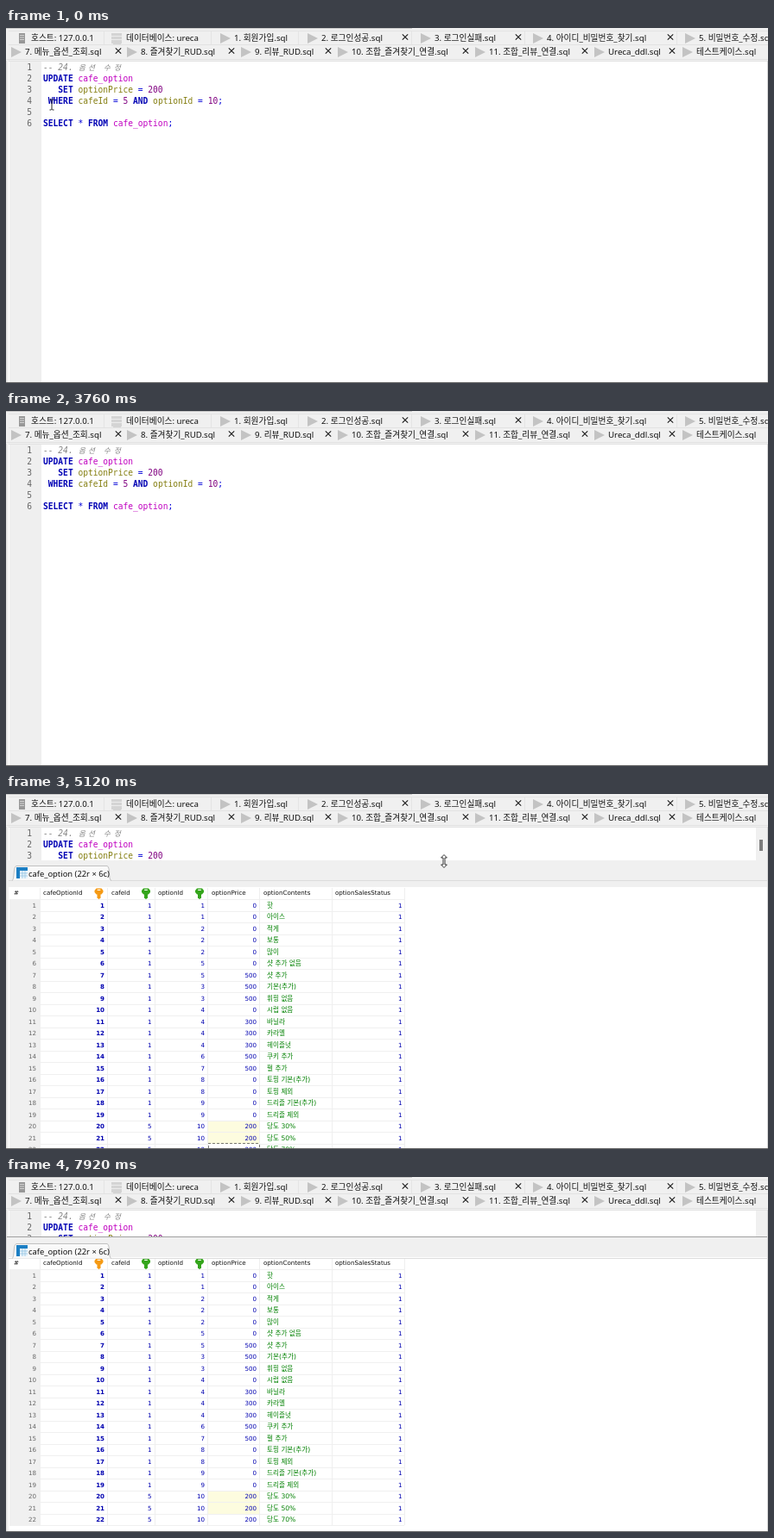
An HTML page for the animation above (8 s loop, 882 px wide and 412 px high).

```html
<!DOCTYPE html>
<html lang="ko">
<head>
<meta charset="utf-8">
<style>
html, body { margin: 0; width: 100%; height: 100%; overflow: hidden; background: #f0f0f0; }
svg { display: block; width: 882px; height: 412px; }
rect { shape-rendering: crispEdges; }
text { white-space: pre; }
.ui { font: 9.7px "Noto Sans", "Noto Sans CJK KR", sans-serif; fill: #111; }
.code { font: 9.6px "DejaVu Sans Mono", "Noto Sans CJK KR", monospace; }
.grid { font: 7.1px "DejaVu Sans", "Noto Sans CJK KR", sans-serif; fill: #111; }
.kw { font-weight: bold; fill: #0000b4; }
.table { fill: #c000c0; }
.col { fill: #857f12; }
.num { fill: #800080; }
.sym { fill: #0000d8; }
.note { font-style: italic; fill: #858585; }
.hangul { font-size: 8.5px; }
.int { fill: #0000b0; }
.str { fill: #008000; font-size: 7.6px; }
.end { text-anchor: end; }
</style>
</head>
<body>
<svg id="stage" viewBox="0 0 882 412"></svg>
<script>
const LOOP = 8000, STEP = 80, ROW = 13.5;
const stage = document.getElementById('stage');

function add(parent, tag, attrs = {}, text) {
  const el = document.createElementNS('http://www.w3.org/2000/svg', tag);
  for (const k in attrs) el.setAttribute(k, attrs[k]);
  if (text !== undefined) el.textContent = text;
  parent.appendChild(el);
  return el;
}
const group = (parent, attrs) => add(parent, 'g', attrs);
const rect = (parent, x, y, width, height, fill) => add(parent, 'rect', { x, y, width, height, fill });
const path = (parent, d, fill, stroke = 'none', w = 1) =>
  add(parent, 'path', { d, fill, stroke, 'stroke-width': w });
const label = (parent, x, y, text, cls = '') => add(parent, 'text', { x, y, class: cls }, text);
const show = (el, on) => el.setAttribute('visibility', on ? 'visible' : 'hidden');
const move = (el, x, y) => el.setAttribute('transform', `translate(${x} ${y})`);

// Editor
const editor = group(stage);
rect(editor, 0, 37, 882, 375, '#f0f0f0');
rect(editor, 3, 38, 878, 374, '#fff');
rect(editor, 4, 38, 37, 374, '#efefef');
rect(editor, 3, 38, 878, 1, '#e3e3e3');

const code = group(editor, { class: 'code' });
const lines = [
  [['note', '-- 24. ']],
  [['kw', 'UPDATE '], ['table', 'cafe_option']],
  [['kw', '   SET '], ['col', 'optionPrice '], ['sym', '= '], ['num', '200']],
  [['kw', ' WHERE '], ['col', 'cafeId '], ['sym', '= '], ['num', '5 '], ['kw', 'AND '],
    ['col', 'optionId '], ['sym', '= '], ['num', '10'], ['sym', ';']],
  [],
  [['kw', 'SELECT '], ['sym', '* '], ['kw', 'FROM '], ['table', 'cafe_option'], ['sym', ';']]
];
lines.forEach((parts, i) => {
  const y = 49.4 + i * 12.85;
  add(code, 'text', { x: 30, y, class: 'end', fill: '#666' }, i + 1);
  const line = add(code, 'text', { x: 43, y });
  parts.forEach(([cls, s]) => add(line, 'tspan', { class: cls }, s));
});
[['옵', 84], ['션', 95], ['수', 113], ['정', 125]].forEach(([s, x]) =>
  label(code, x, 49, s, 'note hangul'));

const scroll = group(editor);
rect(scroll, 868, 39, 13, 373, '#f0f0f0');
const thumb = rect(scroll, 872, 53, 4, 13, '#7c7c7c');

// Query results
const results = group(stage);
const pane = group(results);
rect(pane, 0, 0, 882, 412, '#f0f0f0');
const splitLine = rect(pane, 0, 0, 882, 1, '#a8a8a8');
const sheet = group(results, { class: 'grid' });
rect(sheet, 3, -7, 879, 420, '#fff');
rect(sheet, 4, 7, 35, ROW * 22, '#f0f0f0');

const data = [
  [1, 1, 0, '핫'], [1, 1, 0, '아이스'], [1, 2, 0, '적게'], [1, 2, 0, '보통'], [1, 2, 0, '많이'],
  [1, 5, 0, '샷 추가 없음'], [1, 5, 500, '샷 추가'], [1, 3, 500, '기본(추가)'],
  [1, 3, 500, '휘핑 없음'], [1, 4, 0, '시럽 없음'], [1, 4, 300, '바닐라'],
  [1, 4, 300, '카라멜'], [1, 4, 300, '헤이즐넛'], [1, 6, 500, '쿠키 추가'],
  [1, 7, 500, '펄 추가'], [1, 8, 0, '토핑 기본(추가)'], [1, 8, 0, '토핑 제외'],
  [1, 9, 0, '드리즐 기본(추가)'], [1, 9, 0, '드리즐 제외'],
  [5, 10, 200, '당도 30%'], [5, 10, 200, '당도 50%'], [5, 10, 200, '당도 70%']
];
const rowTop = n => 7 + (n - 1) * ROW;

const rowMark = rect(sheet, 4, 0, 457, ROW, '#dfe1e1');
const matches = [20, 21, 22].map(n => rect(sheet, 234, rowTop(n), 59, ROW, '#fdfcdf'));
for (let i = 0; i <= 22; i++) rect(sheet, 4, rowTop(i + 1), 457, 1, '#f0f0f0');
[39, 117, 172, 233, 293, 377, 461].forEach(x => rect(sheet, x, -6, 1, 13 + ROW * 22, '#efefef'));
const cell = add(sheet, 'rect', { x: 234, width: 59, height: ROW });

[['#', 9], ['cafeOptionId', 43], ['cafeId', 122], ['optionId', 176], ['optionPrice', 238],
  ['optionContents', 298], ['optionSalesStatus', 381]].forEach(([s, x]) => label(sheet, x, 2.3, s));
[[107.5, '#f59a14'], [162, '#35a51c'], [224, '#35a51c']].forEach(([x, color]) => {
  path(sheet, `M${x - 2} 1h4v4.2l-2 2l-2-2z`, color);
  path(sheet, `M${x - 3}-5.5h6l2 2.5v2l-2 2.5h-6l-2-2.5v-2z`, color);
  path(sheet, `M${x - 1.8}-3.6h3.6`, 'none', '#fff', 1.2);
});

const prices = data.map(([cafe, option, price, name], i) => {
  const y = 16.6 + i * ROW;
  const right = (x, s, cls) => label(sheet, x, y, s, 'end ' + cls);
  right(35, i + 1, '').setAttribute('fill', '#666');
  right(114, i + 1, 'int').setAttribute('font-weight', 'bold');
  right(168.5, cafe, 'int');
  right(230, option, 'int');
  label(sheet, 302, y, name, 'str');
  right(458.5, 1, 'int');
  return right(290, price, 'int');
});

const tab = group(results);
rect(tab, 3, 8, 879, 1, '#dcdcdc');
path(tab, 'M7 8.5C10 8 8-8 12-8.5H117C121-8 118 8 122 8.5', '#f9f9f9', '#b4b4b4', .8);
rect(tab, 12, -7, 13, 13, '#1c7fc4');
rect(tab, 16, -3, 9, 9, '#e9f4fb');
path(tab, 'M19-3V6M22-3V6M16 0H25M16 3H25', 'none', '#8ebfe0', .7);
label(tab, 26, 4, 'cafe_option (22r × 6c)', 'ui').style.fontSize = '9.4px';

// Frame and file tabs
const bar = group(stage, { class: 'ui' });
rect(bar, 0, 0, 882, 38, '#f0f0f0');
rect(bar, 0, 0, 470, 1, '#c9c9c9');
rect(bar, 3, 3, 879, 1, '#e4e4e4');
rect(bar, 3, 19, 879, 1, '#e2e2e2');
rect(bar, 0, 36, 882, 1, '#e2e2e2');
[113, 237, 338, 469, 600, 776].forEach(x => rect(bar, x, 4, 1, 15, '#e4e4e4'));
rect(bar, 15, 6, 7, 12, '#989898');
path(bar, 'M16 8.5h5M16 11h5M16 13.5h5', 'none', '#d2d2d2', 1);
add(bar, 'rect', { x: 122, y: 5.5, width: 12, height: 13, rx: 1.5, fill: '#d4d4d4' });
path(bar, 'M122 9.5h12M122 13.5h12', 'none', '#ececec', 1);
label(bar, 29, 15.3, '호스트: 127.0.0.1');
label(bar, 139, 15.3, '데이터베이스: ureca');

const files = [
  [12, [['1. 회원가입', 264], ['2. 로그인성공', 365, 462], ['3. 로그인실패', 496, 593],
    ['4. 아이디_비밀번호_찾기', 626, 769], ['5. 비밀번호_수정', 802]]],
  [28, [['7. 메뉴_옵션_조회', 22, 130], ['8. 즐겨찾기_RUD', 156, 261], ['9. 리뷰_RUD', 288, 373],
    ['10. 조합_즐겨찾기_연결', 400, 532], ['11. 조합_리뷰_연결', 559, 670],
    ['Ureca_ddl', 697, 771], ['테스트케이스', 799]]]
];
files.forEach(([y, tabs]) => tabs.forEach(([name, x, close]) => {
  path(bar, `M${x - 16} ${y - 6}l12 6l-12 6z`, '#c3c3c3');
  label(bar, x, y + 3.4, name + '.sql');
  if (close) path(bar, `M${close - 3.2} ${y - 4.7}l6.4 6.4m0-6.4l-6.4 6.4`, 'none', '#1c1c1c', 1.1);
}));

rect(stage, 0, 38, 1, 374, '#dcdcdc');
rect(stage, 881, 38, 1, 374, '#d5d5d5');
rect(stage, 0, 411, 882, 1, '#6a6a6a');

// Pointers
const pointers = {
  beam: path(stage, 'M-2.5-6H-.7L0-5.3L.7-6H2.5M0-5.3V5.3M-2.5 6H-.7L0 5.3L.7 6H2.5', 'none', '#222', 1),
  arrow: path(stage, 'M0 0V11L2.6 8.7L4.3 12.6L6.1 11.8L4.4 8.1H7.8Z', '#fff', '#111', .8),
  size: path(stage, 'M0-7.5L3.4-4H1V4H3.4L0 7.5L-3.4 4H-1V-4H-3.4Z', '#fff', '#222', .9)
};

// time, x, y, pointer
const pointerKeys = [
  [0, 53, 89, 'beam'], [400, 60, 87, 'beam'], [720, 150, 52, 'beam'], [800, 185, 24, 'arrow'],
  [880, 204, 6, 'arrow'], [960, 208, -12, 'arrow'], [1760, 208, -12, ''],
  [4000, 215, -12, 'arrow'], [4320, 515, 214, 'size'], [4400, 520, 220, 'size'],
  [4720, 520, 137, 'size'], [5120, 507, 78, 'size'], [5280, 505, 70, 'arrow'],
  [5920, 276, 382, 'arrow'], [6400, 278, 385, 'arrow'], [6640, 284, 399, 'arrow'],
  [6880, 284, 399, 'arrow'], [7360, 212, -15, ''], [LOOP, 212, -15, '']
];
// time, splitter, tab centre, header centre
const splitKeys = [
  [4000, 220, 236, 250], [4400, 220, 236, 250], [4720, 137, 152, 169],
  [5120, 77, 92, 115], [5280, 69, 86, 100], [LOOP, 69, 86, 100]
];
// time, focused row, grid has keyboard focus
const focusKeys = [[0, 22, false], [6000, 21, true], [6880, 22, true], [7440, 22, false]];

const lastKey = (keys, t) => keys.reduce((at, key, i) => key[0] <= t ? i : at, 0);
function sample(keys, t) {
  const i = lastKey(keys, t), a = keys[i], b = keys[i + 1] || a;
  const k = b === a ? 0 : Math.max(0, (t - a[0]) / (b[0] - a[0]));
  return a.map((v, j) => typeof v === 'number' ? v + (b[j] - v) * k : v);
}

function drawFocus(t) {
  const [, row, active] = focusKeys[lastKey(focusKeys, t)];
  const dashed = active || t < 5280;
  show(rowMark, active);
  rowMark.setAttribute('y', rowTop(row));
  matches.forEach((el, i) => show(el, row !== 20 + i));
  show(cell, dashed);
  cell.setAttribute('y', rowTop(row));
  cell.setAttribute('fill', active ? '#0878d4' : '#fff');
  cell.setAttribute('stroke', active ? '#d58a38' : '#444');
  cell.setAttribute('stroke-width', .7);
  cell.setAttribute('stroke-dasharray', active ? '1 1' : '3 2');
  prices.forEach((el, i) => el.style.fill = active && i + 1 === row ? '#fff' : '');
}

function draw(time) {
  const t = Math.floor(time % LOOP / STEP) * STEP;
  const open = t >= splitKeys[0][0];
  const [, split, tabY, gridY] = sample(splitKeys, t).map(Math.round);
  results.style.display = scroll.style.display = open ? '' : 'none';
  if (open) {
    move(pane, 0, split);
    move(tab, 0, tabY);
    move(sheet, 0, gridY);
    splitLine.setAttribute('fill', split < 72 ? '#a0a0a0' : '#f0f0f0');
    scroll.style.display = split < 116 ? '' : 'none';
    show(thumb, split > 72);
    drawFocus(t);
  }
  const [, x, y, kind] = sample(pointerKeys, t);
  for (const name in pointers) {
    pointers[name].style.display = name === kind ? '' : 'none';
    move(pointers[name], x, y);
  }
}

function tick() {
  draw(performance.now());
  requestAnimationFrame(tick);
}
tick();
</script>
</body>
</html>
```
